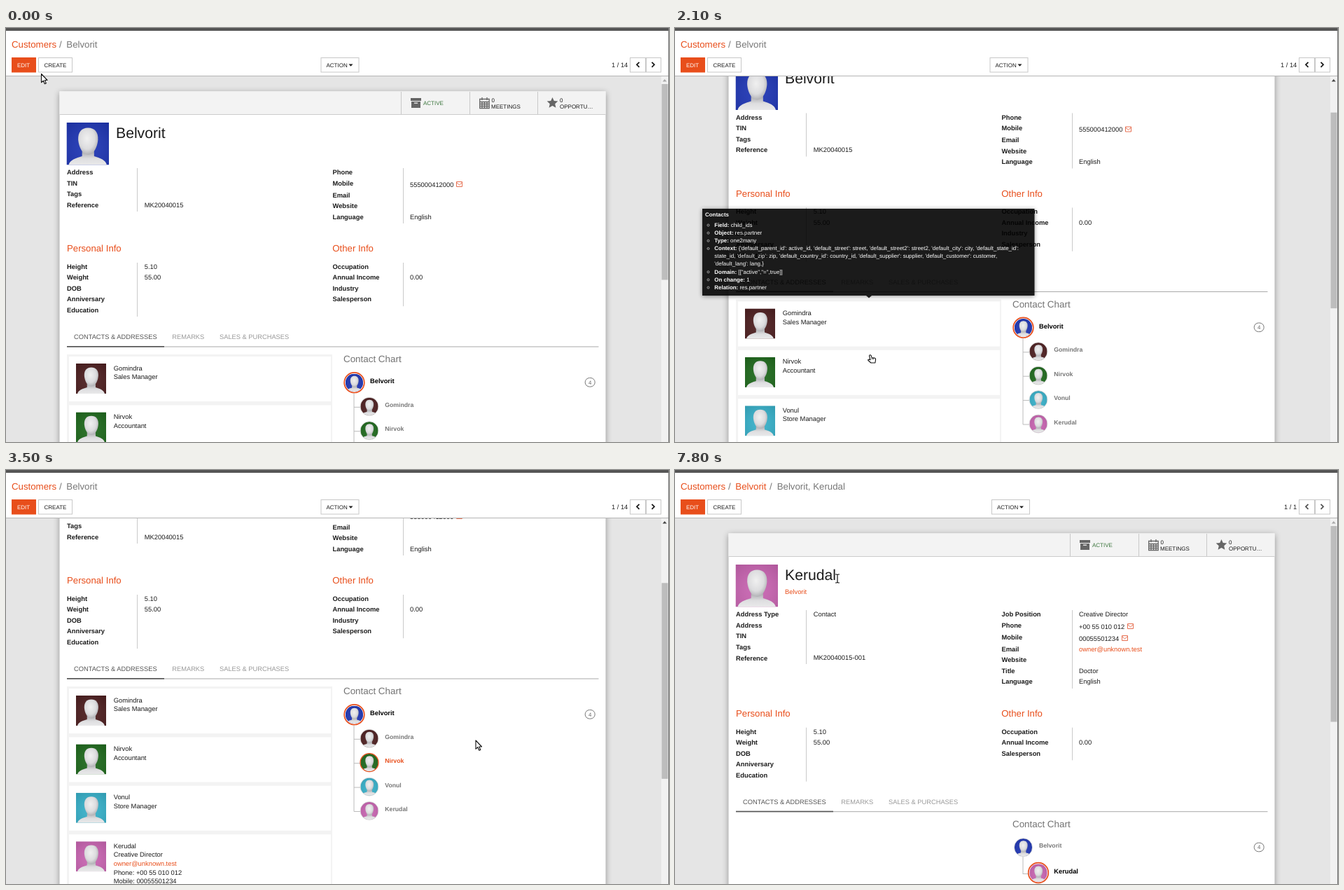
An HTML page that plays this animation: 947 by 591 pixels, repeating every 8000 ms.

```html
<!DOCTYPE html>
<html lang="en">
<head>
<meta charset="utf-8">
<title>Customer form</title>
<style>
html, body { margin: 0; width: 100%; height: 100%; overflow: hidden; background: #fff; }
svg { display: block; }
#stage { position: fixed; left: 0; top: 0; width: 947px; height: 591px; }
text { font-family: "Liberation Sans", Arial, sans-serif; white-space: pre; text-rendering: geometricPrecision; }
.sheet { filter: drop-shadow(0 2px 4px rgba(0,0,0,.38)); }
.hot .name { fill: #e84e1b; }
.hot .ring { stroke: #e84e1b; stroke-width: 1.3; }
.link.hot { fill: #b5390f; text-decoration: underline; }
</style>
</head>
<body>
<svg id="stage" viewBox="0 0 947 591" xmlns="http://www.w3.org/2000/svg"></svg>
<script>
const LOOP = 8000;
const ORANGE = '#e84e1b', INK = '#1c1c1c', GREY = '#777', RULE = '#c9c9c9';
const BLUE = '#1f36b4', BROWN = '#4d1f20', GREEN = '#1f691d', CYAN = '#37b0c9', PINK = '#c864b1';
const COMPANY = 'Belvorit', MAIL = 'owner@unknown.test', REF = 'MK20040015';
const PHONE = '+00 55 010 012', MOBILE = '00055501234';
const PEOPLE = [
  ['Gomindra', 'Sales Manager', BROWN],
  ['Nirvok', 'Accountant', GREEN],
  ['Vonul', 'Store Manager', CYAN],
  ['Kerudal', 'Creative Director', PINK]
];
const PERSON = PEOPLE[3][0];
const $ = id => document.getElementById(id);

// y is the middle of the capitals
const text = (x, y, s, { size = 9.36, fill = INK, bold, attr = '' } = {}) =>
  `<text x="${x}" y="${(y + size * .355).toFixed(2)}" font-size="${size}" fill="${fill}"${bold ? ' font-weight="700"' : ''} ${attr}>${s.replace(/&/g, '&amp;')}</text>`;
const rect = (x, y, w, h, fill, attr = '') => `<rect x="${x}" y="${y}" width="${w}" height="${h}" fill="${fill}" ${attr}/>`;
const path = (d, attr) => `<path d="${d}" ${attr}/>`;
const group = (content, attr = '') => `<g ${attr}>${content}</g>`;
const at = (x, y, content, attr = '') => group(content, `transform="translate(${x} ${y})" ${attr}`);

function avatar(x, y, size, color, round) {
  const art = rect(0, 0, 60, 60, color) + rect(0, 0, 60, 60, 'url(#vignette)') +
    path('M3 60C4 53 14 50 22 47.500V40H39V47.500C47 50 56 53 57 60Z', 'fill="url(#body)"') +
    path('M30.500 7.500C40 7.500 45 14 44.500 24C44 33 39 45.500 30.500 45.500C22 45.500 17 33 16.500 24C16 14 21 7.500 30.500 7.500Z', 'fill="url(#head)"');
  return `<svg x="${x}" y="${y}" width="${size}" height="${size}" viewBox="0 0 60 60">${group(art, round ? 'clip-path="url(#disc)"' : '')}</svg>`;
}

function node(cx, cy, name, color, { id = '', selected, root } = {}) {
  const r = selected ? 14.3 : 13;
  return group(
    (selected ? `<circle cx="${cx}" cy="${cy}" r="${r}" fill="#fff"/>` : '') +
    avatar(cx - 12.7, cy - 12.7, 25.4, color, true) +
    `<circle class="ring" cx="${cx}" cy="${cy}" r="${r}" fill="none" stroke="${selected ? ORANGE : '#ccc'}" stroke-width="${selected ? 1.7 : .7}"/>` +
    text(root ? 520 : 541.3, cy - 2.4, name, { size: selected ? 9.3 : 8.7, fill: selected ? '#000' : GREY, bold: true, attr: 'class="name"' }),
    id && `id="${id}"`);
}

function envelope(x, y) {
  return path(`M${x + .5} ${y - 3.5}h8v7h-8zM${x + .5} ${y - 2.500}l4 3.500l4-3.500`, 'fill="none" stroke="#e4603f" stroke-width=".9"');
}

function labels(x, ys, names) {
  return names.map((name, i) => text(x, ys + i * 15.55, name, { bold: true })).join('');
}
const rule = (x, y1, y2) => rect(x, y1, 1, y2 - y1, RULE);

function sheetTop(name, color) {
  const tools =
    rect(578, 100, 15, 4, '#666') + rect(579, 105, 13, 9, '#666') + rect(583, 106.500, 5, 1.300, '#f3f3f3') +
    text(596, 107.500, 'ACTIVE', { size: 8, fill: '#3c763d' }) +
    path('M676.700 101.500h13.500v13h-13.500zM677 105.500h13M677 108.500h13M677 111.500h13M680 105v9M683.500 105v9M687 105v9M680 99v4M687 99v4', 'fill="none" stroke="#666" stroke-width="1.3"') +
    text(693.500, 103, '0', { size: 8 }) + text(693, 112, 'MEETINGS', { size: 8 }) +
    path('M780.500 99l2.300 5 5.500.600-4.100 3.700 1.200 5.500-4.900-2.800-4.900 2.800 1.200-5.500-4.100-3.700 5.500-.600z', 'fill="#666"') +
    text(791, 103, '0', { size: 8 }) + text(791, 112, 'OPPORTU…', { size: 8 });
  return rect(76.500, 90.500, 780, 900, '#fff', 'class="sheet"') +
    rect(76.500, 90.500, 780, 33, '#f3f3f3') + rect(76.500, 123, 780, 1, '#ccc') +
    [564, 662, 759].map(x => rule(x, 91, 123)).join('') + tools +
    avatar(86.500, 135, 60.500, color) + text(157, 149.500, name, { size: 21.2 });
}

// Info blocks and tabs; identical on both pages apart from their height
function lowerForm(dy, other) {
  return at(0, dy,
    text(87, 314.500, 'Personal Info', { size: 13.2, fill: ORANGE }) +
    text(466.300, 314.500, 'Other Info', { size: 13.2, fill: ORANGE }) +
    labels(87, 340.500, ['Height', 'Weight', 'DOB', 'Anniversary', 'Education']) + rule(187, 335, 412) +
    text(197.800, 340.500, '5.10') + text(197.800, 356, '55.00') +
    labels(466.500, 340.500, other) + rule(567, 335, 335 + other.length * 15.55) + text(577, 356, '0.00') +
    text(97, 441, 'CONTACTS & ADDRESSES', { size: 9.3, fill: '#555' }) +
    text(237.300, 441, 'REMARKS', { size: 9.3, fill: '#999' }) +
    text(305, 441, 'SALES & PURCHASES', { size: 9.3, fill: '#999' }) +
    rect(87, 454.500, 759.500, 1, '#aaa') + rect(87, 454, 139, 1.600, '#555') +
    text(482, 472.500, 'Contact Chart', { size: 13.4, fill: '#737373' }) +
    `<rect x="827.200" y="499.500" width="14" height="12.600" rx="6.300" fill="none" stroke="#777"/>` +
    text(832, 506, '4', { size: 7.9, fill: '#666' }));
}

function card([name, job, color], i) {
  const y = 469 + i * 69.4, last = i === 3;
  const lines = last ? [name, job, MAIL, 'Phone: ' + PHONE, 'Mobile: ' + MOBILE] : [name, job];
  return rect(90, y, 374, last ? 90 : 64, '#fff') + avatar(100, y + 10, 43, color) +
    lines.map((s, k) => text(153.700, y + 16.200 + k * 12.6, s, { fill: s === MAIL ? ORANGE : INK })).join('');
}

function companyPage() {
  const childY = i => 540.3 + i * 34.4;
  return sheetTop(COMPANY, BLUE) +
    labels(87, 206, ['Address', 'TIN', 'Tags', 'Reference']) + rule(187, 200, 262) + text(197.800, 252.500, REF) +
    labels(466.500, 206, ['Phone', 'Mobile']) + labels(466.500, 238.500, ['Email', 'Website', 'Language']) + rule(567, 200, 279) +
    text(577, 223.500, '555000412000') + envelope(643, 223) + text(577, 269.500, 'English') +
    lowerForm(0, ['Occupation', 'Annual Income', 'Industry', 'Salesperson']) +
    rect(87, 466, 379, 310, '#f3f3f3') + PEOPLE.map(card).join('') +
    rect(496.500, 520, 1, childY(3) - 519, '#bbb') +
    PEOPLE.map((p, i) => rect(497, childY(i) + .5, 9, 1, '#bbb') + node(519, childY(i), p[0], p[2], { id: 'child' + i })).join('') +
    node(497.500, 506.2, COMPANY, BLUE, { selected: true, root: true });
}

function personPage() {
  return sheetTop(PERSON, PINK) +
    text(157, 174, COMPANY, { fill: ORANGE, attr: 'id="parentLink" class="link"' }) +
    labels(87, 206, ['Address Type', 'Address', 'TIN', 'Tags', 'Reference']) + rule(187, 200, 277) +
    text(197.800, 206, 'Contact') + text(197.800, 268, REF + '-001') +
    labels(466.500, 206, ['Job Position', 'Phone']) + text(466.500, 238.500, 'Mobile', { bold: true }) +
    labels(466.500, 255.500, ['Email', 'Website', 'Title', 'Language']) + rule(567, 200, 312) +
    text(577, 206, 'Creative Director') + text(577, 223.500, PHONE) + envelope(646, 223) +
    text(577, 240.500, MOBILE) + envelope(638, 240) +
    text(577, 255.500, MAIL, { fill: ORANGE, attr: 'id="mailLink" class="link"' }) +
    text(577, 286.500, 'Doctor') + text(577, 302, 'English') +
    lowerForm(32.7, ['Occupation', 'Annual Income', 'Salesperson']) +
    rect(496.500, 552, 1, 25, '#bbb') + rect(497, 576, 8, 1, '#bbb') +
    node(497.500, 538.8, COMPANY, BLUE, { root: true }) + node(519, 575, PERSON, PINK, { selected: true });
}

function button(x, w, label, labelX, primary) {
  return rect(x + .5, 42.500, w - 1, 20.500, primary ? ORANGE : '#fff', `stroke="${primary ? ORANGE : '#c8c8c8'}"`) +
    text(labelX, 52.800, label, { size: 8, fill: primary ? '#fff' : INK });
}

function header(crumbs, actionX, count, countX, arrows) {
  return crumbs.map(([x, s, fill]) => text(x, 23, s, { size: 13.25, fill })).join('') +
    button(8, 35, 'EDIT', 16, true) + button(46, 49, 'CREATE', 54.500) +
    button(actionX, 55, 'ACTION', actionX + 8) +
    path(`M${actionX + 40} 51.500h6l-3 3.200z`, `fill="${INK}"`) +
    text(countX, 52.500, count, { size: 9.3 }) + button(891, 23, '', 0) + button(914, 22, '', 0) +
    path('M904.500 48.800l-3.500 3.500l3.500 3.500M922.500 48.800l3.500 3.500l-3.500 3.500', `fill="none" stroke="${arrows}" stroke-width="1.8"`);
}

function tooltip() {
  const items = [
    ['Field:', 'child_ids', 0], ['Object:', 'res.partner', 1], ['Type:', 'one2many', 2],
    ['Context:', "{'default_parent_id': active_id, 'default_street': street, 'default_street2': street2, 'default_city': city, 'default_state_id':", 3],
    ['Domain:', '[["active","=",true]]', 6], ['On change:', '1', 7], ['Relation:', 'res.partner', 8]
  ];
  const style = { size: 7.95, fill: '#fff' };
  const lineY = i => 281 + i * 11.13;
  return rect(39, 258, 474.500, 124, '#000', 'style="filter:drop-shadow(0 1px 3px rgba(0,0,0,.5))"') +
    path('M273 382h8l-4 3.500z', 'fill="#000"') + text(43, 266, 'Contacts', { ...style, bold: true }) +
    items.map(([key, value, i]) =>
      `<circle cx="47.500" cy="${lineY(i) + .5}" r="1.500" fill="none" stroke="#ddd" stroke-width=".7"/>` +
      text(56.300, lineY(i), `<tspan font-weight="700">${key}</tspan> ${value}`, style)).join('') +
    text(56.300, lineY(4), "state_id, 'default_zip': zip, 'default_country_id': country_id, 'default_supplier': supplier, 'default_customer': customer,", style) +
    text(56.300, lineY(5), "'default_lang': lang,}", style);
}

const outline = 'fill="#fff" stroke="#111" stroke-width="1.1" stroke-linejoin="round"';
const CURSORS = {
  arrow: path('M.5.5V12.800L3.300 10.200 5.300 14.800 7.300 13.900 5.300 9.500H9Z', outline),
  hand: path('M3 1C4 .300 5.200 1.300 5.400 2.300L5.900 4.500L10 5C11.400 5.300 11.800 6.300 11.500 8L10.900 12H4.900L.900 8.500C.200 7.300 1.800 6.600 4 7.700L2.600 2.500C2.500 1.800 2.500 1.300 3 1ZM6.500 5v2M8.500 5.200v1.800', outline),
  beam: path('M.5.500H2.500L3.500 1.200L4.500.500H6.500M3.500 1V12M.5 12.500H2.500L3.500 11.800L4.500 12.500H6.500', 'fill="none" stroke="#111" stroke-width="1.2"')
};

const stop = (o, c, a = 1) => `<stop offset="${o}" stop-color="${c}" stop-opacity="${a}"/>`;
$('stage').innerHTML = `<defs>
  <radialGradient id="head" cx=".45" cy=".4" r=".65">${stop(0, '#f0f0f0')}${stop(.6, '#dcdcde')}${stop(1, '#a9a9ad')}</radialGradient>
  <linearGradient id="body" x2="0" y2="1">${stop(0, '#a5a5a9')}${stop(.55, '#dedee0')}${stop(1, '#e9e9ea')}</linearGradient>
  <radialGradient id="vignette" cy=".6" r=".75">${stop(0, '#fff', .06)}${stop(1, '#000', .12)}</radialGradient>
  <clipPath id="disc"><circle cx="30" cy="30" r="30"/></clipPath>
  <clipPath id="view"><rect y="69" width="936" height="522"/></clipPath></defs>` +
  rect(0, 0, 947, 591, '#fff') + rect(0, 69, 936, 522, '#e5e5e5') +
  group(group(companyPage(), 'id="company"') + group(personPage(), 'id="person"'), 'clip-path="url(#view)"') +
  rect(0, 0, 947, 4, '#555') + rect(0, 68, 946, 1, '#b5b5b5') +
  group(header([[8, 'Customers', ORANGE], [76, '/', GREY], [86.300, COMPANY, GREY]], 449.500, '1 / 14', 865, INK), 'id="companyHead"') +
  group(header([[8, 'Customers', ORANGE], [76, '/', GREY], [86.300, COMPANY, ORANGE], [135, '/', GREY], [145.700, `${COMPANY}, ${PERSON}`, GREY]], 452, '1 / 1', 870, '#555'), 'id="personHead"') +
  rect(936, 69, 10, 522, '#f1f1f1') + path('M937.800 76.500h6l-3-3.500z', 'id="upArrow"') +
  rect(936.500, 80, 9, 279.500, '#bdbdbd', 'id="thumb"') + rect(946, 0, 1, 591, '#777') +
  group(tooltip(), 'id="tip"') + rect(0, 590, 236, 1, '#b9b9b9', 'id="status"') +
  Object.entries(CURSORS).map(([kind, art]) => group(art, `id="${kind}"`)).join('');

// time, x, y, kind, and whether the pointer glides here from the previous key
const POINTER = [
  [0, 50, 65, 'arrow'], [900, 185, 306, 'arrow', 1], [1500, 350, 462, 'arrow', 1], [1600, 369, 488, 'hand', 1],
  [2100, 275, 466, 'hand', 1], [2400, 574, 496, 'arrow', 1], [3400, 610, 418, 'hand'], [3500, 670.5, 385.5, 'arrow'],
  [3700, 556, 447, 'hand'], [3900, 591, 382, 'arrow'], [4100, 560, 420, 'hand'], [4200, 560, 463, 'arrow'],
  [4400, 557, 482, 'hand'], [4600, 556, 512, 'arrow'], [4800, 552, 482, 'hand'], [5300, 527, 449, 'arrow'],
  [5600, 522, 490, 'hand'], [5900, 575, 380, 'arrow'], [6200, 600, 254, 'hand'], [6600, 401, 312, 'arrow'],
  [6900, 301, 345, 'arrow'], [7200, 325, 313, 'arrow'], [7400, 165, 163, 'hand'], [7800, 228.5, 148.5, 'beam']
];
const HOVER = [[0, -1], [3400, 1], [3700, 2], [3900, 0], [4100, 1], [4200, 2], [4400, 3], [4600, -1], [4800, 3]];
const SCROLL = [[0, 0], [1700, 22], [1800, 62], [1900, 78.5], [3200, 157], [6200, 0]];
const TIP = [[0, 0], [1900, .6], [2000, .89], [2400, .82], [3400, 0]];

const lastKey = (keys, t) => keys.findLastIndex(k => k[0] <= t);
const hold = (keys, t) => keys[lastKey(keys, t)][1];
const show = (id, on) => $(id).setAttribute('display', on ? 'inline' : 'none');
const hot = (id, on) => $(id).classList.toggle('hot', on);

function pointer(t) {
  const i = lastKey(POINTER, t), [t0, x, y, kind] = POINTER[i], next = POINTER[i + 1];
  if (!next || !next[4]) return [x, y, kind];
  const p = (t - t0) / (next[0] - t0);
  return [x + (next[1] - x) * p, y + (next[2] - y) * p, kind];
}

function draw(time) {
  const t = Math.floor(time / 100) * 100;
  const onPerson = t >= 6200, scroll = hold(SCROLL, t);
  show('company', !onPerson);
  show('companyHead', !onPerson);
  show('person', onPerson);
  show('personHead', onPerson);
  $('company').setAttribute('transform', `translate(0 ${-scroll})`);
  $('thumb').setAttribute('y', 80 + scroll * .518);
  $('upArrow').setAttribute('fill', scroll ? '#444' : '#aaa');
  const tipOpacity = hold(TIP, t);
  show('tip', tipOpacity > 0);
  $('tip').setAttribute('opacity', tipOpacity);
  PEOPLE.forEach((_, i) => hot('child' + i, hold(HOVER, t) === i));
  hot('mailLink', t >= 6200 && t < 6600);
  hot('parentLink', t >= 7400 && t < 7800);
  show('status', t >= 5100 && t < 6900);
  const [x, y, kind] = pointer(t);
  for (const name in CURSORS) show(name, name === kind);
  $(kind).setAttribute('transform', `translate(${x} ${y})`);
}

const start = performance.now();
function tick() {
  draw((performance.now() - start) % LOOP);
  requestAnimationFrame(tick);
}
tick();
</script>
</body>
</html>
```
